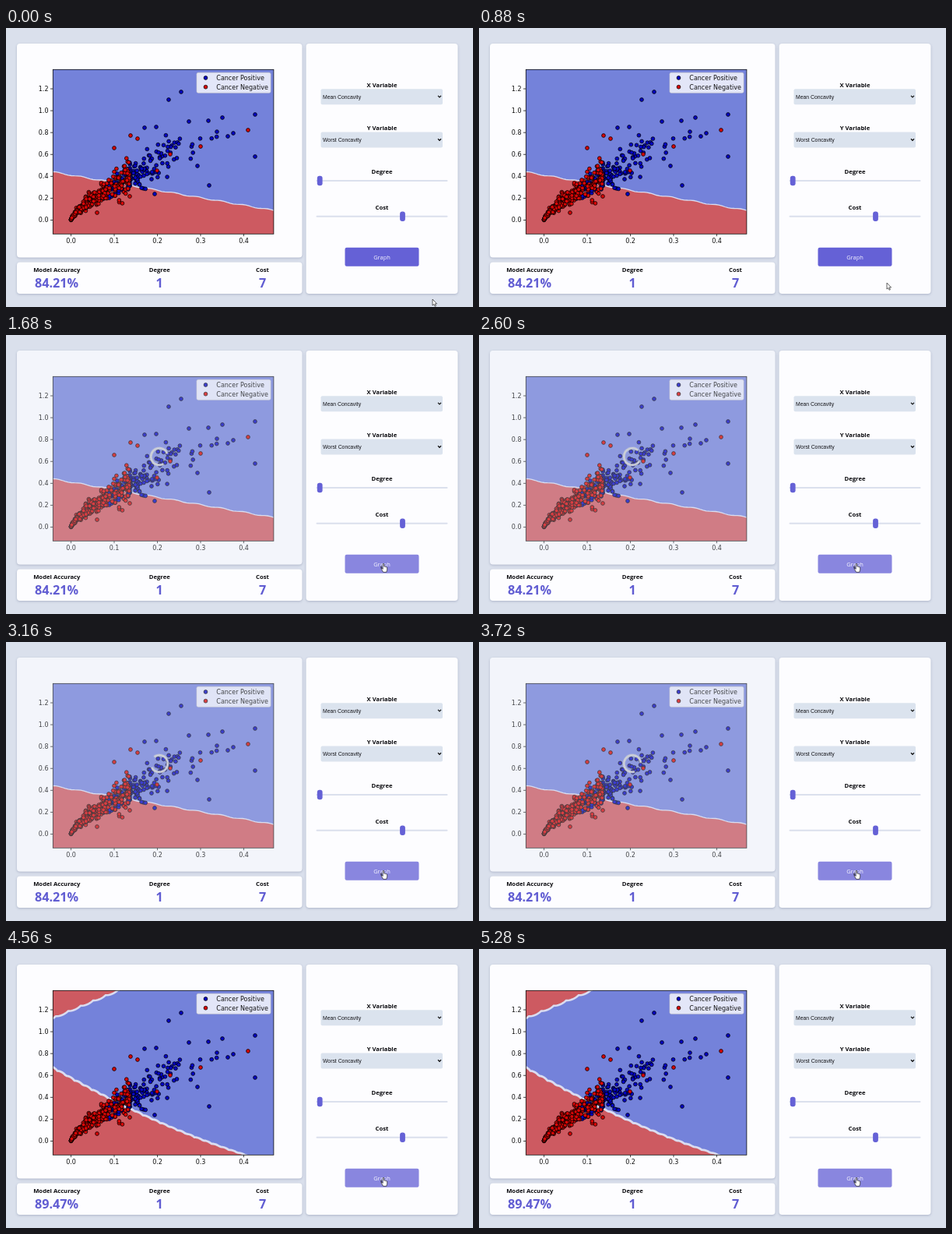
Animation of 600 by 358 pixels, one loop 5.32 s. Source, as an HTML page:

```html
<!DOCTYPE html>
<html lang="en">
<head>
<meta charset="utf-8">
<title>Classifier dashboard</title>
<style>
html, body { margin: 0; width: 100%; height: 100%; overflow: hidden; background: #dae0ec; }
svg { display: block; width: 600px; height: 358px; }
text { font-family: "Open Sans", "Noto Sans", sans-serif; }
.card { fill: #fdfdff; filter: drop-shadow(0 1px 1.5px rgba(70, 80, 120, .3)); }
.label { font-size: 7.7px; font-weight: 700; text-anchor: middle; fill: #0c0c10; }
.value { font-size: 16.2px; font-weight: 700; text-anchor: middle; fill: #605cd2; }
.option { font: 6.85px "Liberation Sans", Arial, sans-serif; fill: #15151a; }
.plot text { font: 8px "DejaVu Sans", sans-serif; fill: #111; }
.thumb, .button rect { fill: #6561d6; }
.button text { font-size: 7.5px; text-anchor: middle; fill: #f3f2ff; }
.neg { fill: #cd5a61; }
.edge { fill: none; stroke: #dadcf0; }
.dots circle { stroke: #000; stroke-width: .75; }

/* One loop: 5320 ms */
.button { animation: hover 5.32s linear infinite; }
.pointer { animation: travel 5.32s linear infinite; }
.spin { animation: spin 5.32s linear infinite; transform-origin: 197px 156px; }
.arrow { animation: arrow 5.32s step-end infinite; }
.hand { animation: hand 5.32s step-end infinite; }
.loader { animation: load 5.32s step-end infinite; }
.before { animation: before 5.32s step-end infinite; }
.after { animation: after 5.32s step-end infinite; }
.old-score { animation: old-score 5.32s step-end infinite; }
.new-score { animation: new-score 5.32s step-end infinite; }

@keyframes travel {
  0%, 12.03% { transform: translate(548px, 348px); animation-timing-function: ease-in-out; }
  22.556%, 100% { transform: translate(485px, 293px); }
}
@keyframes hover { 0%, 18.8% { opacity: 1; } 22%, 100% { opacity: .76; } }
@keyframes spin { from { transform: rotate(135deg); } to { transform: rotate(2050.2deg); } }
@keyframes arrow { 0% { opacity: 1; } 18.8%, 100% { opacity: 0; } }
@keyframes hand { 0% { opacity: 0; } 18.8%, 100% { opacity: 1; } }
@keyframes load { 0% { opacity: 0; } 26.316% { opacity: 1; } 75.94%, 100% { opacity: 0; } }
@keyframes before { 0% { opacity: 1; } 75.94%, 100% { opacity: 0; } }
@keyframes after { 0% { opacity: 0; } 75.94%, 100% { opacity: 1; } }
@keyframes old-score { 0% { opacity: 1; } 77.444%, 100% { opacity: 0; } }
@keyframes new-score { 0% { opacity: 0; } 77.444%, 100% { opacity: 1; } }
</style>
</head>
<body>
<svg viewBox="0 0 600 358">
  <defs><clipPath id="area"><rect x="60" y="53" width="284" height="211"/></clipPath></defs>
  <rect class="card" x="14" y="20" width="366.5" height="274.5" rx="4"/>
  <rect class="card" x="14" y="300.5" width="366.5" height="40.5" rx="4"/>
  <rect class="card" x="385.5" y="20" width="195" height="321" rx="4"/>

  <g class="plot">
    <rect x="60" y="53" width="284" height="211" fill="#7482da"/>
    <g clip-path="url(#area)">
      <g class="before" id="before"></g>
      <g class="after" id="after"></g>
      <g class="dots" id="dots"></g>
    </g>
    <rect x="60.3" y="53.3" width="283.6" height="211" fill="none" stroke="#111" stroke-width=".8"/>
    <g id="ticks" stroke-width=".8"></g>
    <rect x="245" y="57.3" width="95" height="26" rx="2" fill="#fff" fill-opacity=".8" stroke="#ccc" stroke-opacity=".8" stroke-width=".8"/>
    <g class="dots">
      <circle cx="256.5" cy="64" r="2.4" fill="#0505c4"/>
      <circle cx="256.5" cy="75.7" r="2.4" fill="#d90606"/>
    </g>
    <text x="270.3" y="66.6">Cancer Positive</text>
    <text x="270.3" y="78.5">Cancer Negative</text>
  </g>

  <g class="loader">
    <rect x="14" y="20" width="366.5" height="274.5" rx="4" fill="#d7deee" fill-opacity=".26"/>
    <g class="spin">
      <circle cx="197" cy="156" r="10.8" fill="none" stroke="#cdd0d6" stroke-width="2.8" pathLength="100" stroke-dasharray="78 22" stroke-dashoffset="-11"/>
    </g>
  </g>

  <text class="label" x="65.3" y="313">Model Accuracy</text>
  <text class="label" x="197.3" y="313">Degree</text>
  <text class="label" x="329.5" y="313">Cost</text>
  <text class="value old-score" x="65" y="333">84.21%</text>
  <text class="value new-score" x="65" y="333">89.47%</text>
  <text class="value" x="197" y="333">1</text>
  <text class="value" x="329.5" y="333">7</text>

  <g id="form"></g>
  <g class="button">
    <rect x="435.5" y="281.7" width="95" height="24" rx="2.2"/>
    <text x="483" y="296.7">Graph</text>
  </g>

  <g class="pointer" stroke="#111" stroke-width=".65" stroke-linejoin="round" fill="#fff">
    <path class="arrow" d="M0 0V8L1.8 6.4 3.1 9.2 4.4 8.6 3.1 5.9H5.6Z"/>
    <path class="hand" d="M-.8 .8Q0-.5 .8 .8V4L2.1 4.2 3.4 4.6 4.7 5.2V8.3L3.8 11.3H-.3L-2.6 7.7Q-3-.2-3 6.4-2.3 5.8-.8 7.5Z"/>
  </g>
</svg>

<script>
const $ = id => document.getElementById(id);
const px = x => 83.5 + 555 * x;
const py = y => 246.5 - 140.4 * y;

// Decision regions: sample a boundary y = f(x)
const trace = (f, from, to, step) => {
  let pts = "";
  for (let x = from; x <= to; x += step) pts += `${x},${f(x).toFixed(1)} `;
  return pts;
};
const region = (line, corners, width) =>
  `<polygon class="neg" points="${line}${corners}"/>` +
  `<polyline class="edge" stroke-width="${width}" points="${line}"/>`;
// Holds the curve nearly flat within each cell, like a coarse grid
const stairs = (f, cell) => x => {
  const k = Math.floor(x / cell), u = x / cell - k;
  return f((k + u ** 2.2) * cell);
};

const wave = x => 184.7 + .174 * (x - 60) - .75 * Math.sin((x - 209) * Math.PI / 15);
const upper = x => 88 - .422 * (x - 60);
const lower = x => {
  const t = (x - 60) / 245;
  return 153 + 143 * t - 32 * t * t;
};
$("before").innerHTML = region(trace(wave, 60, 344, 4), "344,264 60,264", 1.3);
$("after").innerHTML =
  region(trace(stairs(upper, 16), 60, 146, 2), "60,53", 2.6) +
  region(trace(stairs(lower, 11), 60, 310, 2), "60,270", 2.8);

// Scatter: a few stray points, the rest follows a noisy trend
let seed = 4127;
const rnd = () => (seed = seed * 16807 % 2147483647) / 2147483647;
const gauss = () => (rnd() + rnd() + rnd() + rnd() - 2) * 1.73;
const blue = "#0505c4", red = "#d90606";
const dot = (x, y, color) => `<circle cx="${x.toFixed(1)}" cy="${y.toFixed(1)}" r="2.4" fill="${color}"/>`;
const cloud = (n, pickX, spread, color) => {
  let out = "";
  for (let i = 0; i < n; i++) {
    const x = pickX();
    out += dot(px(x), py(1.65 * x ** .72 * (1 + spread * gauss())), color);
  }
  return out;
};
const strays = (list, color) => list.map(([x, y]) => dot(x, y, color)).join("");

$("dots").innerHTML =
  strays([[225, 82], [209, 92], [320, 111], [278, 115], [260, 119], [235, 120], [193, 127], [178, 128],
    [292, 135], [285, 139], [320, 165], [261, 202], [191, 213], [246, 177]], blue) +
  cloud(120, () => .135 + .032 * gauss(), .15, blue) +
  cloud(40, () => .16 + .1 * rnd(), .16, blue) +
  cloud(8, () => .27 + .07 * rnd(), .08, blue) +
  cloud(310, () => .135 * rnd() ** 1.4, .2, red) +
  strays([[311, 131], [160, 138], [169, 142], [139, 154], [211, 162], [250, 152], [194, 183], [117, 237],
    [159, 216]], red);

// Axes
let ticks = "";
for (let i = 0; i < 5; i++) {
  const x = px(i / 10);
  ticks += `<path stroke="#111" d="M${x} 264.2v3"/><text x="${x}" y="276" text-anchor="middle">${(i / 10).toFixed(1)}</text>`;
}
for (let i = 0; i < 7; i++) {
  const y = py(i / 5);
  ticks += `<path stroke="#111" d="M60 ${y}h-3"/><text x="54.5" y="${y + 2.9}" text-anchor="end">${(i / 5).toFixed(1)}</text>`;
}
$("ticks").innerHTML = ticks;

// Controls
const label = (s, y) => `<text class="label" x="483" y="${y}">${s}</text>`;
const select = (name, value, y) => label(name, y - 2.4) +
  `<rect x="404.5" y="${y}" width="156.5" height="20" rx="2" fill="#dbe3ee"/>` +
  `<text class="option" x="407" y="${y + 12.4}">${value}</text>` +
  `<path d="M555 ${y + 8.7}l2 2 2-2" fill="none" stroke="#111" stroke-width="1.3"/>`;
const slider = (name, x, y) => label(name, y - 9.3) +
  `<rect x="398.5" y="${y - 1}" width="169" height="2" rx="1" fill="#dbe0ed"/>` +
  `<rect class="thumb" x="${x - 3.4}" y="${y - 6.3}" width="6.8" height="12.6" rx="3"/>`;
$("form").innerHTML = select("X Variable", "Mean Concavity", 78.2) + select("Y Variable", "Worst Concavity", 133.6) +
  slider("Degree", 403.2, 196) + slider("Cost", 509.5, 241.8);
</script>
</body>
</html>
```
